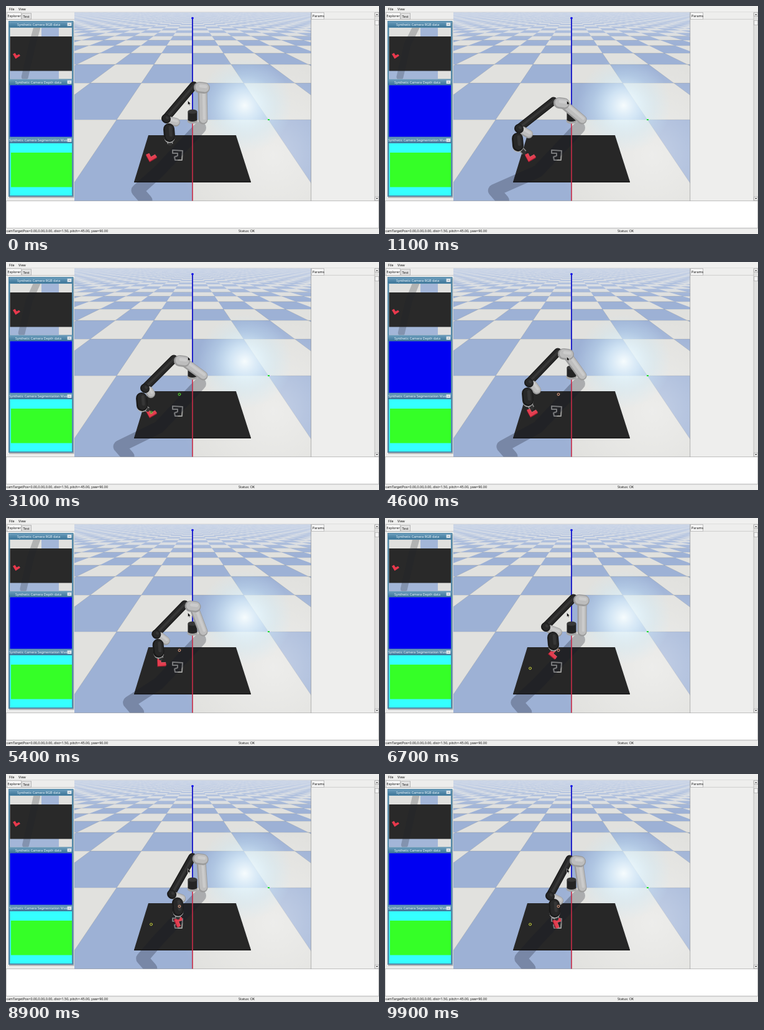
These frames come from a looping animation (600x367 px, 10000 ms). An HTML page with a canvas:

```html
<!DOCTYPE html>
<html lang="en">
<head>
<meta charset="utf-8">
<title>Robot arm simulation</title>
<style>
html, body { margin: 0; width: 100%; height: 100%; overflow: hidden; background: #eee; }
canvas { display: block; }
</style>
</head>
<body>
<canvas id="stage" width="600" height="367"></canvas>
<script>
const ctx = document.getElementById('stage').getContext('2d');
const LOOP = 10000, STEP = 100, HORIZON = 2;

// time, then x,y of: shoulder, elbow, wrist block, wrist, tool tip
const POSES = [
  [0,    316,131, 257,181, 273,187, 262,198, 264,222],
  [1100, 285,156, 215,197, 231,206, 213,213, 224,236],
  [3100, 284,159, 223,203, 233,212, 218,219, 228,238],
  [4600, 292,148, 231,194, 244,206, 229,211, 236,235],
  [6700, 317,132, 258,175, 278,184, 270,192, 270,212],
  [8100, 316,134, 267,191, 284,198, 279,206, 277,230],
  [9900, 311,140, 265,196, 280,204, 272,210, 276,233]
];

const ramp = (t, from, to) => Math.max(0, Math.min(1, (t - from) / (to - from)));
const shift = ([x, y], dx, dy) => [x + dx, y + dy];
const mix = (a, b, k) => a.map((n, i) => n + (b[i] - n) * k);

function poseAt(t) {
  let i = 0;
  while (i < POSES.length - 2 && t > POSES[i + 1][0]) i++;
  const a = POSES[i], b = POSES[i + 1];
  const v = mix(a, b, ramp(t, a[0], b[0]));
  const at = j => [v[j], v[j + 1]];
  const shoulder = at(1), elbow = at(3), wrist = at(7), tip = at(9);
  return {
    shoulder, elbow, wrist, tip, block: at(5),
    top: shift(shoulder, -14, -3),
    end: shift(wrist, 1, 12),
    shade: [elbow[0] * .85 - 7, 297],
    piece: mix([234, 243], shift(tip, 1, 7), ramp(t, 3100, 4600)),
    angle: 1.7 * ramp(t, 4600, 7500)
  };
}

function rect(color, x, y, w, h) { ctx.fillStyle = color; ctx.fillRect(x, y, w, h); }
function path(points, close) {
  ctx.beginPath();
  points.forEach(([x, y]) => ctx.lineTo(x, y));
  if (close) ctx.closePath();
}
function poly(color, points) { path(points, true); ctx.fillStyle = color; ctx.fill(); }
function line(color, w, points, cap = 'butt', close = false) {
  path(points, close);
  ctx.strokeStyle = color; ctx.lineWidth = w; ctx.lineCap = cap; ctx.lineJoin = 'round';
  ctx.stroke();
}
function oval(color, x, y, rx, ry) {
  ctx.beginPath(); ctx.ellipse(x, y, rx, ry, 0, 0, 7);
  ctx.fillStyle = color; ctx.fill();
}
function ring(color, x, y) {
  ctx.beginPath(); ctx.arc(x, y, 1.9, 0, 7);
  ctx.strokeStyle = color; ctx.lineWidth = 1; ctx.stroke();
}
function text(s, x, y, color = '#111') {
  ctx.font = '5.4px "Noto Sans", "Open Sans", sans-serif';
  ctx.fillStyle = color; ctx.fillText(s, x, y);
}
function box(fill, x, y, w, h, edge = '#9a9a9a') {
  rect(edge, x, y, w, h); rect(fill, x + .6, y + .6, w - 1.2, h - 1.2);
}
function clip(x, y, w, h) {
  ctx.beginPath(); ctx.rect(x, y, w, h); ctx.clip();
}

const rowY = n => HORIZON + 181 * 2.07 / (n + 2.07);
const tileW = y => 122 * (y - HORIZON) / 181;
const onGrid = (k, y) => [300 + k * tileW(y), y];

function glow(x, y, r, ...colors) {
  const g = ctx.createRadialGradient(x, y, 0, x, y, r);
  colors.forEach((c, i) => g.addColorStop(i / (colors.length - 1), c));
  rect(g, 110, 10, 381, 304);
}

function drawFloor() {
  rect('#e1e1de', 110, 10, 381, 304);
  for (let n = -1; n < 42; n++) {
    const far = rowY(n + 1), near = rowY(n);
    const reach = Math.ceil(195 / tileW(far)) + 1;
    for (let k = -reach; k < reach; k++) {
      if ((n + k) & 1) continue;
      poly('#9db1d5', [onGrid(k, far), onGrid(k + 1, far), onGrid(k + 1, near), onGrid(k, near)]);
    }
    if (n < 6) line('rgba(110,110,100,.45)', .5, [[110, far], [490, far]]);
  }
  for (let k = -6; k <= 6; k++)
    line('rgba(110,110,100,.35)', .5, [onGrid(k, 75), onGrid(k, 360)]);
  const haze = ctx.createLinearGradient(0, 10, 0, 60);
  haze.addColorStop(0, 'rgba(205,216,235,.8)');
  haze.addColorStop(1, 'rgba(205,216,235,0)');
  rect(haze, 110, 10, 381, 50);
  glow(430, 240, 150, 'rgba(255,255,255,.4)', 'rgba(255,255,255,0)');
  glow(384, 160, 76, 'rgba(250,255,255,.95)', 'rgba(225,245,255,.7)',
    'rgba(205,235,250,.32)', 'rgba(205,235,250,0)');
}

function drawShadow(p) {
  ctx.save();
  clip(110, 10, 381, 304);
  line('rgba(20,25,38,.27)', 20, [[312, 196], [246, 266], p.shade, shift(p.shade, 14, 16)], 'round');
  ctx.restore();
}

function drawTable() {
  poly('#272727', [[229, 208], [370, 208], [394, 283], [206, 283]]);
  line('#161616', 1.2, [[206, 283.4], [394, 283.4]]);
  line('#9c9c9a', 2, [[268, 232], [284, 233], [283, 248], [272, 248],
    [271, 243], [276, 241], [276, 237], [268, 237]], 'butt', true);
}

function drawAxes() {
  line('#0808c8', 1.7, [[300, 19], [300, 172]]);
  oval('#0000e8', 300, 19.5, 1.8, 1.8);
  line('#c92c48', 1.6, [[300, 188], [300, 314]]);
  rect('#20e030', 421, 182, 3, 2);
}

function drawPiece(p) {
  const shape = [[-9, -4], [-4, -6], [-1, 0], [6, -4], [9, 0], [-3, 7]];
  ctx.save();
  ctx.translate(...p.piece);
  ctx.rotate(p.angle);
  poly('#a61f31', shape.map(q => shift(q, 0, 1.5)));
  poly('#e33e50', shape);
  line('#f06a76', .7, shape.slice(1, 4));
  ctx.restore();
}

// A rounded tube: dark rim, body and a lit streak.
const LIGHT = ['#9b9b9b', '#bdbdbd', '#cbcbcb'], DARK = ['#1b1b1b', '#282828', '#363636'];
function tube([rim, body, lit], w, ...points) {
  line(rim, w, points, 'round');
  line(body, w * .78, points.map(q => shift(q, .6, -.6)), 'round');
  line(lit, w * .28, points.map(q => shift(q, w * .12, -w * .12)), 'round');
}

function drawArm(p) {
  oval('#a4a4a4', 300, 185, 8.5, 4.5);
  rect('#242424', 292.5, 170, 15, 13);
  oval('#242424', 300, 183, 7.5, 3);
  oval('#383838', 300, 170, 7.5, 3.4);

  tube(DARK, 13, p.top, p.elbow);
  tube(LIGHT, 15, p.shoulder, [317, 183]);
  tube(LIGHT, 18, shift(p.shoulder, -5, 0), shift(p.shoulder, 3, 1));
  tube(LIGHT, 14, shift(p.elbow, 7, 4), p.block);
  tube(DARK, 14, p.elbow, shift(p.elbow, 1, 1));
  line('#8d8d8d', 9, [p.end, p.tip]);
  line('#333', 6, [p.end, p.tip], 'round');
  line('#b2b2b2', 17, [p.wrist, shift(p.end, 0, 2)], 'round');
  tube(DARK, 18, p.wrist, p.end);
}

function drawMarkers(t, over) {
  if (t < 2000) return;
  const early = t < 4000, covered = t >= 6000 && t < 8900;
  if (covered !== over) ring(early ? '#55e834' : '#e7a184', 279, 213);
  if (over && (early || t > 5600)) ring(early ? '#55e834' : '#ced83a', 233.5, 242);
}

function drawCursor() {
  const arrow = [[292.5, 152.5], [292.5, 159], [294, 157.8], [295, 160],
    [296, 159.5], [295.2, 157.4], [297, 157.2]];
  poly('#0a0a0a', arrow);
  line('#e8e8e8', .5, arrow, 'butt', true);
}

function titleBar(s, x, y) {
  const g = ctx.createLinearGradient(0, y, 0, y + 9);
  g.addColorStop(0, '#6b9dbc');
  g.addColorStop(1, '#3d7699');
  rect(g, 5, y, 102, 9);
  text(s, x, y + 6.7, '#eef6fb');
  box('#e9eef1', 98.5, y + 1.7, 7, 5.6, '#b9cbd6');
  rect('#7b8a93', 100.5, y + 4.2, 3, .8);
}

function drawThumb(p) {
  ctx.save();
  clip(6.5, 35, 99.5, 82.5);
  rect('#e0e0de', 6, 35, 100, 83);
  rect('#a3b6d8', 57, 35, 28, 15);
  rect('#a3b6d8', 6, 104, 79, 14);
  rect('#292929', 6, 49, 100, 55.5);
  const x = 24 + (p.elbow[0] - 215) * .15;
  line('rgba(30,34,44,.24)', 11, [[50, 34], [x + 12, 62], [x, 114]], 'round');
  poly('#e8384c', [[11, 77.5], [14.5, 75.5], [17, 79.5], [21, 77.5], [23, 80], [15.5, 85]]);
  ctx.restore();
}

function drawLeftPanel(p) {
  rect('#ededec', 0, 10, 110, 304);
  box('#f8f8f8', 1, 10.5, 24, 11);
  text('Explorer', 2.5, 18);
  box('#e4e4e4', 25.5, 11.5, 15.5, 10);
  text('Test', 27.5, 18.5);
  line('#aaa', .6, [[0, 21.5], [110, 21.5]]);
  rect('#b8b8b8', 5, 26, 104.5, 283);
  rect('#5389a8', 4, 24, 104.5, 283);
  titleBar('Synthetic Camera RGB data', 18, 25);
  drawThumb(p);
  titleBar('Synthetic Camera Depth data', 15, 118);
  rect('#0000f2', 6.5, 127.5, 99.5, 83);
  titleBar('Synthetic Camera Segmentation Mask', 5, 211.5);
  rect('#35ffff', 6.5, 221, 99.5, 84);
  rect('#35ff27', 8, 236, 98, 55.5);
}

function drawChrome() {
  rect('#f0f0ef', 0, 0, 600, 10);
  text('File', 5, 6.6);
  text('View', 20, 6.6);
  line('#c4c4c4', .5, [[0, 9.7], [600, 9.7]]);

  rect('#eeeeed', 491, 10, 109, 304);
  line('#999', .7, [[490.7, 10], [490.7, 314]]);
  box('#f7f7f7', 491, 10.5, 21, 11);
  text('Params', 493, 18);
  line('#b4b4b4', .6, [[512, 21.3], [593, 21.3]]);
  rect('#e0e0df', 593, 10, 7, 304);
  line('#aaa', .6, [[593, 10], [593, 314]]);
  box('#f4f4f4', 593.5, 23, 6.5, 8);
  for (const [y, d] of [[13.6, -1], [310, 1]]) {
    box('#f4f4f4', 593.5, y - 3.2, 6.5, 6.5);
    poly('#333', [[595, y - d], [598.5, y - d], [596.7, y + d]]);
  }

  box('#fff', 0, 313.5, 600, 44, '#999');
  rect('#eeeeed', 0, 357.5, 600, 10);
  line('#bbb', .6, [[0, 358], [600, 358]]);
  text('camTargetPos=0.00,0.00,0.00, dist=1.50, pitch=-45.00, yaw=90.00', .5, 364);
  text('Status: OK', 374, 364);
}

function draw(now) {
  const t = Math.floor(now % LOOP / STEP) * STEP, p = poseAt(t);
  drawFloor();
  drawTable();
  drawShadow(p);
  drawAxes();
  drawMarkers(t, false);
  drawPiece(p);
  drawArm(p);
  drawMarkers(t, true);
  drawCursor();
  drawLeftPanel(p);
  drawChrome();
  requestAnimationFrame(draw);
}
requestAnimationFrame(draw);
</script>
</body>
</html>
```
